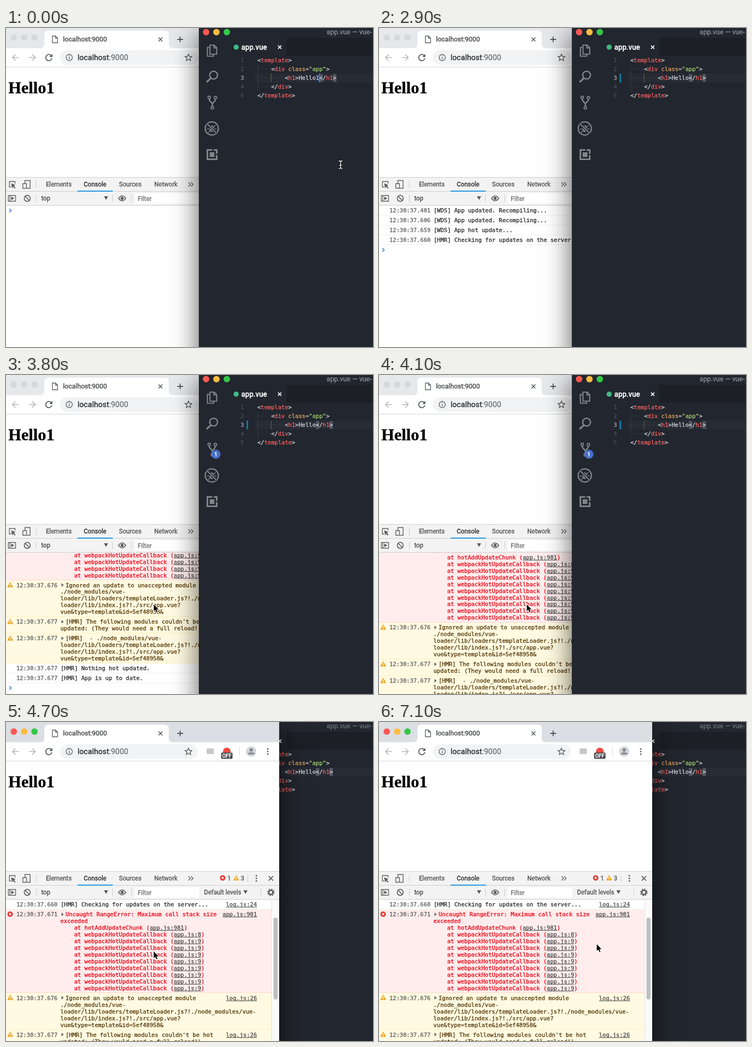
An HTML page with a canvas that plays this animation: 708x616 px, repeating every 7.2 s.

```html
<!DOCTYPE html>
<html lang="en">
<head>
<meta charset="utf-8">
<style>
  html, body { margin: 0; width: 100%; height: 100%; overflow: hidden; }
  canvas { display: block; }
</style>
</head>
<body>
<canvas width="708" height="616"></canvas>
<script>
const g = document.querySelector('canvas').getContext('2d');
const LOOP = 7200, STEP = 100;
const TYPED = 1200, SAVED = 2500, SWITCHED = 4600;
const MONO = '11px "DejaVu Sans Mono", monospace';
const ui = (size, weight = 400) => `${weight} ${size}px Roboto, sans-serif`;
const LINE = 12.95, CONSOLE_TOP = 343;
const INK = '#5a5a5a', ICON = '#7f838a', EDITOR = '#22262e';

// Drawing helpers
function box(x, y, w, h, color) {
  g.fillStyle = color;
  g.fillRect(x, y, w, h);
}
function fill(path, color) {
  g.fillStyle = color;
  g.fill(new Path2D(path));
}
function stroke(path, color, width = 1) {
  g.strokeStyle = color;
  g.lineWidth = width;
  g.stroke(new Path2D(path));
}
function dot(x, y, r, color) {
  g.beginPath();
  g.arc(x, y, r, 0, 7);
  g.fillStyle = color;
  g.fill();
}
function ring(x, y, r, color, width) {
  g.beginPath();
  g.arc(x, y, r, 0, 2 * Math.PI);
  g.strokeStyle = color;
  g.lineWidth = width;
  g.stroke();
}
function pill(x, y, w, h, r, color) {
  g.beginPath();
  g.roundRect(x, y, w, h, r);
  g.fillStyle = color;
  g.fill();
}
// A hairline stroke gives glyphs the heavier weight of desktop smoothing
function text(s, x, y, color, font = MONO) {
  g.font = font;
  g.fillStyle = g.strokeStyle = color;
  g.lineWidth = 0.3;
  g.fillText(s, x, Math.round(y));
  g.strokeText(s, x, Math.round(y));
  return x + g.measureText(s).width;
}
function link(s, x, y) {
  const end = text(s, x, y, '#484848');
  box(x, Math.round(y) + 1, end - x, 1, '#484848');
  return end;
}
const cross = (x, y, r, color, width) =>
  stroke(`M${x - r} ${y - r}l${2 * r} ${2 * r}m0 ${-2 * r}l${-2 * r} ${2 * r}`, color, width);
const downArrow = (x, y) => fill(`M${x - 4} ${y - 3}h8l-4 7z`, INK);
const dots = (x, y) => [-5, 0, 5].forEach(d => dot(x, y + d, 1.6, INK));
const lights = (x, y, colors) => colors.forEach((c, i) => dot(x + 20 * i, y, 6.2, c));
const LIGHTS = ['#fc5753', '#fdbc40', '#33c748'];

function windowBase(x, y, w, h, color, focused) {
  g.shadowColor = `rgba(0,0,0,${focused ? 0.64 : 0.3})`;
  g.shadowBlur = 48;
  g.shadowOffsetY = 14;
  box(x, y, w, h, color);
  g.shadowColor = 'transparent';
}

function errorIcon(x, y) {
  dot(x, y, 5.3, '#db3a30');
  cross(x, y, 2, '#fff', 1.4);
}
function warningIcon(x, y) {
  fill(`M${x} ${y - 5.5}l5.8 10.5h-11.6z`, '#efa928');
  box(x - 0.7, y - 2, 1.4, 4, '#fff');
  box(x - 0.7, y + 2.7, 1.4, 1.3, '#fff');
}

// Console
const STYLE = {
  log: { bg: '#fff', rule: '#f0f0f0', ink: '#282828' },
  error: { bg: '#ffeded', rule: '#ffd6d6', ink: '#e60012', icon: errorIcon },
  warn: { bg: '#fffae1', rule: '#fff0bd', ink: '#523504', icon: warningIcon },
};
const entry = (at, ms, kind, lines, source) => ({ at, ms, kind, lines, source });
const call = (name, line) => `    at ${name} (app.js:${line})`;
const modulePath = [
  './node_modules/vue-',
  'loader/lib/loaders/templateLoader.js?!./node_modules/vue-',
  'loader/lib/index.js?!./src/app.vue?',
  'vue&type=template&id=5ef48958&',
];
const entries = [
  entry(2700, 401, 'log', ['[WDS] App updated. Recompiling...']),
  entry(2900, 606, 'log', ['[WDS] App updated. Recompiling...']),
  entry(2900, 659, 'log', ['[WDS] App hot update...']),
  entry(2900, 660, 'log', ['[HMR] Checking for updates on the server...'], 'log.js:24'),
  entry(3000, 671, 'error', [
    'Uncaught RangeError: Maximum call stack size', 'exceeded',
    call('hotAddUpdateChunk', 981), call('webpackHotUpdateCallback', 8),
    ...Array(8).fill(call('webpackHotUpdateCallback', 9)),
  ], 'app.js:981'),
  entry(3400, 676, 'warn', ['Ignored an update to unaccepted module', ...modulePath], 'log.js:26'),
  entry(3400, 677, 'warn', ["[HMR] The following modules couldn't be hot",
    'updated: (They would need a full reload!)'], 'log.js:26'),
  entry(3400, 677, 'warn', ['[HMR]  - ' + modulePath[0], ...modulePath.slice(1)], 'log.js:26'),
  entry(3400, 677, 'log', ['[HMR] Nothing hot updated.']),
  entry(3400, 677, 'log', ['[HMR] App is up to date.']),
];

function drawEntry({ ms, kind, lines, source }, y) {
  const { bg, rule, ink, icon } = STYLE[kind];
  const end = y + lines.length * LINE + 6.05;
  const top = Math.round(y), bottom = Math.round(end);
  box(0, top, 513, bottom - top, bg);
  box(0, bottom - 1, 513, 1, rule);
  const base = y + 13.4;
  if (icon) {
    icon(8, top + 9);
    fill(`M107 ${top + 6}l4.5 3.5-4.5 3.5z`, '#6e6e6e');
  }
  text('12:30:37.' + ms, 20, base, '#5c5c5c');
  lines.forEach((line, i) => {
    let x = icon ? (i ? 105 : 115) : 105.5;
    const stack = line.startsWith('    at');
    for (const part of line.split(/(app\.js:\d+)/))
      x = stack && part.startsWith('app.js') ? link(part, x, base + i * LINE)
                                             : text(part, x, base + i * LINE, ink);
  });
  if (source) link(source, 484 - source.length * 6.62, base);
  return end;
}

const clamp = v => Math.max(0, Math.min(1, v));
const ease = (t, from, to) => {
  const p = clamp((t - from) / (to - from));
  return p * p * (3 - 2 * p);
};
const mix = (a, b, p) => a + (b - a) * p;

function drawConsole(t) {
  const scroll = t < 3400 ? 0 : mix(184.3, t < SWITCHED ? 58 : 57, ease(t, 3800, 4300));
  g.save();
  g.beginPath();
  g.rect(0, CONSOLE_TOP, 527, 273);
  g.clip();
  let y = CONSOLE_TOP - scroll;
  for (const e of entries) if (t >= e.at) y = drawEntry(e, y);
  stroke(`M6.5 ${y + 6}l3.5 3.5-3.5 3.5`, '#3674d8', 1.6);
  box(513, CONSOLE_TOP, 14, 273, '#fafafa');
  box(512, CONSOLE_TOP, 1, 273, '#e4e4e4');
  pill(516, CONSOLE_TOP + scroll * 0.61, 8, 158, 4, '#c0c0c0');
  g.restore();
}

function drawToolbar() {
  text('localhost:9000', 110, 26, '#3c4043', ui(12.9));
  stroke('M89.5 15.5h6l4 4v9h-10zM95.5 15.5v4h4', '#55585c', 1.3);
  cross(298, 22, 3.7, '#4c5055', 1.5);
  stroke('M330.5 22h11m-5.5-5.5v11', '#4c5055', 1.8);
  stroke('M25 57H12.5m6-6l-6 6 6 6M44 57h12.5m-6-6l6 6-6 6', '#b4b6b9', 1.7);
  stroke('M87 53a6 6 0 1 0 1.5 5.5', '#55585c', 1.8);
  fill('M89.5 50v6h-6z', '#55585c');
  pill(104, 43, 266, 28, 14, '#f1f3f4');
  ring(122, 57, 6, '#5f6368', 1.4);
  box(121.3, 56, 1.5, 4.5, '#5f6368');
  box(121.3, 53, 1.5, 1.6, '#5f6368');
  const port = text('localhost', 138, 62, '#25282c', ui(14.9));
  text(':9000', port, 62, '#6d7175', ui(14.9));
  stroke('M352 50.5l1.9 4.3 4.7.4-3.6 3.1 1.1 4.6-4.1-2.4-4.1 2.4 1.1-4.6-3.6-3.1 4.7-.4z', '#55585c', 1.4);
  pill(387, 51, 14, 11, 2, '#c6c8ca');
  dot(426, 57, 7.5, '#ec4a42');
  pill(415, 59, 22, 12, 2, '#45484c');
  text('OFF', 417, 69, '#fff', ui(10, 500));
  box(450, 48, 1, 18, '#d8dadd');
  dot(473, 57, 10, '#d3d5d8');
  dot(473, 54, 3.2, '#85898e');
  fill('M466.5 62.5q0-4 6.5-4t6.5 4z', '#85898e');
  dots(505, 57);
}

function drawDevtools() {
  box(0, 288, 527, 55, '#f3f3f3');
  for (const y of [288, 315, 342]) box(0, y, 527, 1, '#cdcdcd');
  box(138, 314, 68, 2, '#2196e0');
  const tabs = [['Elements', 77], ['Console', 150], ['Sources', 218], ['Network', 286]];
  for (const [name, x] of tabs) text(name, x, 306, name === 'Console' ? '#222' : '#505050', ui(12));
  stroke('M352 298l4 4-4 4m5-8l4 4-4 4', INK, 1.4);
  stroke('M10 307H6.5V296.5h11v4', INK, 1.3);
  fill('M10 300l8.5 3.5-3.5 1.5 3.5 3.5-1.5 1.5-3.5-3.5-1.5 3.5z', INK);
  stroke('M36.5 300v-5.5h10v15h-6', INK, 1.4);
  stroke('M32.5 300.5h7v9h-7z', INK, 1.4);
  errorIcon(418, 301);
  text('1', 427, 306, '#505050', ui(12));
  warningIcon(444, 301);
  text('3', 453, 306, '#505050', ui(12));
  dots(483, 302);
  cross(511, 302, 4.3, INK, 1.7);

  stroke('M4.5 323.5h14v11h-14zM7.5 324v10', INK, 1.3);
  fill('M10 325.5l6 3.5-6 3.5z', INK);
  ring(41, 329, 5.8, INK, 1.7);
  stroke('M37 325l8 8', INK, 1.7);
  text('top', 68, 333, '#404040', ui(12));
  downArrow(193, 328);
  stroke('M217 329q7-9.5 14 0q-7 9.5-14 0z', INK, 1.7);
  dot(224, 329, 2.9, INK);
  box(249, 319, 124, 20, '#fff');
  text('Filter', 254, 334, '#707070', ui(12));
  text('Default levels', 382, 333, '#505050', ui(12));
  downArrow(462, 328);
  ring(511, 329, 4, INK, 2.6);
  g.setLineDash([2.5, 2.2]);
  ring(511, 329, 6, INK, 2.2);
  g.setLineDash([]);
  for (const [x, y] of [[58, 295], [466, 295], [58, 322], [205, 322], [242, 322], [491, 322]])
    box(x, y, 1, 14, '#cbcbcb');
}

function drawBrowser(t, focused) {
  windowBase(0, 0, 527, 640, '#fff', focused);
  box(0, 0, 527, 39, focused ? '#dbdee3' : '#e6e8ec');
  lights(15, 18.5, focused ? LIGHTS : Array(3).fill('#d6d8dc'));
  fill('M66 39q8 0 8-8V13q0-8 8-8H306q8 0 8 8v18q0 8 8 8z', '#fff');
  drawToolbar();
  box(0, 75, 527, 1, '#d2d4d7');
  text('Hello1', 4.5, 126, '#000', 'bold 32px "Liberation Serif", serif');
  drawDevtools();
  drawConsole(t);
}

// Editor
function badge(y) {
  dot(405, y, 8.8, '#486fc9');
  g.textAlign = 'center';
  text('1', 405, y + 4, '#fff', ui(11, 500));
  g.textAlign = 'left';
}

function drawActivityBar(t) {
  stroke('M393.5 33h8l5 5v12.5h-13zM401 33v5.5h5.5M393 37.5h-4.5v17h12v-4', ICON, 2.2);
  ring(400.5, 91, 7.5, ICON, 2.6);
  stroke('M395 97l-8 7.5', ICON, 3.4);
  for (const [x, y] of [[392, 134], [404, 134.5], [398, 154]]) ring(x, y, 2.5, ICON, 1.9);
  stroke('M392 137c0 6 6 6 6 10v4M404 137.5c0 5-6 6-6 10', ICON, 2.6);
  ring(397, 194, 12.7, ICON, 2.5);
  fill('M393 192q4-8 8 0v6q-4 6-8 0z', ICON);
  stroke('M388 195h18M390 188l4 4M404 188l-4 4M390 202l4-4M404 202l-4-4', ICON, 1.6);
  stroke('M388 185l18 18', EDITOR, 5);
  stroke('M388 185l18 18', ICON, 2.3);
  stroke('M388.5 235.5h18v18h-18z', ICON, 3.2);
  box(398, 233, 2.5, 5, EDITOR);
  box(404, 243, 5, 2.5, EDITOR);
  box(393, 240, 9, 9, ICON);
  if (t >= 1300 && t < SAVED) badge(53);
  if (t >= 3600) badge(153);
}

const PLAIN = '#d3d6dc', TAG = '#f0605f', ATTR = '#e3a55c', STRING = '#a3d36c';
const tag = (open, name) => [[open, PLAIN], [name, TAG]];
function codeLines(word) {
  return [
    [0, ...tag('<', 'template'), ['>', PLAIN]],
    [4, ...tag('<', 'div'), [' class', ATTR], ['=', PLAIN], ['"app"', STRING], ['>', PLAIN]],
    [8, ...tag('<', 'h1'), ['>' + word, PLAIN], ...tag('</', 'h1'), ['>', PLAIN]],
    [4, ...tag('</', 'div'), ['>', PLAIN]],
    [0, ...tag('</', 'template'), ['>', PLAIN]],
  ];
}

function drawCode(t, focused) {
  const edited = t >= TYPED, word = edited ? 'Hello' : 'Hello1';
  const caretX = 564.6 + word.length * 6.62;
  box(480, 88, 228, 17, '#272b34');
  box(485, 71, 1, 51, '#353a42');
  box(511, 88, 1, 17, '#66664f');
  box(caretX, 89, 6.6, 15, '#515762');
  box(caretX + 26.5, 89, 6.6, 15, '#515762');
  if (edited) box(464, 88, 3, 17, '#0b7ba3');
  codeLines(word).forEach(([indent, ...runs], i) => {
    const y = 66 + 17 * i;
    text(i + 1, 452.5, y, i === 2 ? '#a0a5ae' : '#484d57');
    text('·'.repeat(indent), 485, y, '#3c4149');
    let x = 485 + indent * 6.62;
    for (const [s, color] of runs) x = text(s, x, y, color);
  });
  const phase = (edited ? t - TYPED : t) % 1000;
  if (focused && phase < 500) box(caretX - 1, 88, 2.2, 17, '#4178e6');
}

function drawEditor(t, focused) {
  const dirty = t >= TYPED && t < SAVED;
  windowBase(372, -3, 400, 660, EDITOR, focused);
  box(541, 19, 167, 35, '#1c1f26');
  lights(386, 8, LIGHTS);
  if (dirty) dot(386, 8, 2, '#7d1512');
  text('app.vue — vue-', 618.5, 12, focused ? '#8d929b' : '#6c717a', ui(13.2));
  dot(444, 37, 5, '#41b883');
  text('app.vue', 454, 42, '#fff', ui(14, 500));
  if (dirty) dot(528, 37.5, 4, '#a4a8b0');
  else cross(528, 37, 3.2, '#fff', 1.8);
  drawActivityBar(t);
  drawCode(t, focused);
}

function drawPointer(t) {
  if (t >= TYPED && t <= 3500) return;
  const into = ease(t, 3400, 3800), across = ease(t, 4700, 5200);
  const x = t < TYPED ? 645.5 : mix(mix(640, 285, into), 420, across);
  const y = t < TYPED ? 264 : mix(mix(264, 443, into), 429, across);
  if (t < SWITCHED && x > 372) {
    const beam = `M${x - 3.5} ${y - 7.5}q3.5 0 3.5 2.5v10q0 2.5-3.5 2.5`
      + `M${x + 3.5} ${y - 7.5}q-3.5 0-3.5 2.5v10q0 2.5 3.5 2.5M${x - 2} ${y + 1}h4`;
    stroke(beam, '#111', 2.6);
    stroke(beam, '#fff', 1.3);
  } else {
    const arrow = `M${x} ${y}v13l3-2.8 2.1 4.9 2.2-1-2.1-4.7h4z`;
    stroke(arrow, '#fff', 2);
    fill(arrow, '#000');
  }
}

function draw() {
  const t = Math.floor(performance.now() % LOOP / STEP) * STEP;
  g.clearRect(0, 0, 708, 616);
  if (t < SWITCHED) {
    drawBrowser(t, false);
    drawEditor(t, true);
  } else {
    drawEditor(t, false);
    drawBrowser(t, true);
  }
  drawPointer(t);
  requestAnimationFrame(draw);
}
draw();
</script>
</body>
</html>
```
